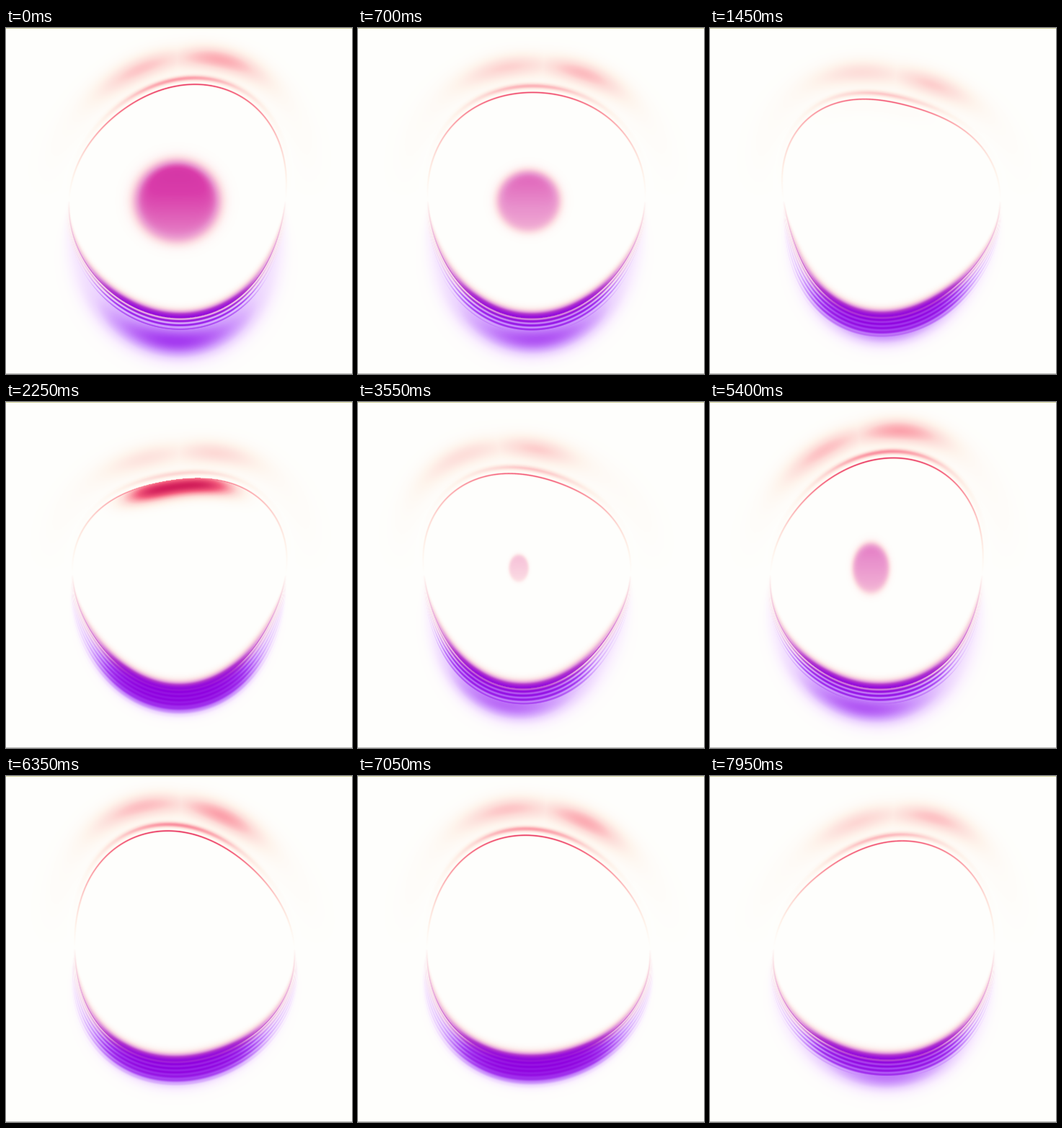
Recreate the animation shown at these times as an HTML page with a canvas. Size 480 px wide and 480 px high, loop 8 s.

```html
<!DOCTYPE html>
<html lang="en">
<head>
<meta charset="utf-8">
<title>Breathing ring</title>
<style>
html, body { margin: 0; width: 100%; height: 100%; overflow: hidden; background: #fefefc; }
canvas { display: block; width: 100vw; height: 100vh; }
</style>
</head>
<body>
<canvas id="stage" width="480" height="480"></canvas>
<script>
const SIZE = 480, LOOP = 8000, STEP = 50, BINS = 2048;
const ctx = document.getElementById('stage').getContext('2d');
const image = ctx.createImageData(SIZE, SIZE), px = image.data.fill(255);

const lerp = (a, b, u) => a + (b - a) * u;
const clamp = x => Math.max(0, Math.min(1, x));
const bell = x => Math.exp(-x * x);
const plateau = x => Math.exp(-(x ** 4));
const sigmoid = x => 1 / (1 + Math.exp(x));

function makeRamp(hexes) {
  const stops = [0, .1, .25, .45, .7, 1];
  const colors = hexes.split(' ').map(h => [0, 2, 4].map(i => parseInt(h.slice(i, i + 2), 16)));
  const out = new Float32Array(256 * 3);
  for (let n = 0, i = 0; n < 256; n++) {
    const v = n / 255;
    while (i < 4 && v > stops[i + 1]) i++;
    const u = (v - stops[i]) / (stops[i + 1] - stops[i]);
    out.set(colors[i].map((c, j) => lerp(c, colors[i + 1][j], u)), n * 3);
  }
  return out;
}
const rose = makeRamp('fefefc fef4ec fddcd8 fca8b0 f25a7c d21e5a');
const orchid = makeRamp('fefefc fde6e8 f6c0d8 e890cc d93caa c8289b');
const plum = makeRamp('fefefc fdf2f0 f8d7e1 e4a0dc b43ccd 8e00de');
const haze = makeRamp('fefefc faf0fe ecd4fe cd96fc a53cf0 8e00de');

// Polar coordinates of every pixel, clockwise from the top.
const bin = new Uint16Array(SIZE * SIZE), dist = new Float32Array(SIZE * SIZE);
for (let y = 0, i = 0; y < SIZE; y++) for (let x = 0; x < SIZE; x++, i++) {
  const dx = x + .5 - 240, dy = y + .5 - 240;
  bin[i] = Math.floor((Math.atan2(dx, -dy) / (2 * Math.PI) + 1) * BINS) % BINS;
  dist[i] = Math.hypot(dx, dy);
}

function paint(i, v, ramp, other = ramp, mix = 0) {
  const n = Math.round(clamp(v) * 255) * 3;
  for (let c = 0; c < 3; c++) px[i * 4 + c] = lerp(ramp[n + c], other[n + c], mix);
}

function draw(ms) {
  const t = ms / 1000;
  const wave = (mid, amp, period, peak) => mid + amp * Math.cos(2 * Math.PI * (t - peak) / period);

  // The outline is a circle bent by three slowly drifting harmonics.
  const radius = wave(150.3, 5.5, 6.8, 6.5);
  const rise = wave(-1.7, 4.3, 7, 5.8), sway = wave(-2, 9, 6.2, 1.15);
  const oval = wave(2.5, 4, 5.75, 5.1), tilt = wave(.6, 5.2, 2.65, 0);
  const corner = wave(-2.5, 4.5, 8.6, 6.8), twist = wave(-1, 5, 2.65, 0);

  // One pulse opens the core and loosens the lower rim.
  const pulse = wave(0, 1, 4.6, 0);
  const heat = wave(.33, .11, 7, 6);
  const flare = bell((t - 2.25) / .4);
  const depth = 26 - 6 * pulse, reach = 56 + 13 * pulse, looseness = .1 + .18 * pulse;

  const rays = Array.from({ length: BINS }, (_, n) => {
    const a = n / BINS * 2 * Math.PI;
    const deg = (n / BINS * 360 + 180) % 360 - 180;
    const up = Math.cos(a), down = Math.max(0, -up);
    const top = deg - 1.3 * sway;
    const low = (deg + 360) % 360 - 183 + .9 * sway;
    const dense = plateau(low / 44);
    return {
      up, dense,
      r: radius + rise * up + sway * Math.sin(a)
        + oval * Math.cos(2 * a) + tilt * Math.sin(2 * a)
        + corner * Math.cos(3 * a) + twist * Math.sin(3 * a),
      glow: heat * Math.max(bell((top - 14) / 18), .75 * bell((top + 18) / 20)),
      band: 1.2 * heat * bell(deg / 36),
      line: (.45 + heat) * Math.pow(Math.max(0, up), 1.3),
      flare: flare * plateau((deg + 1) / 33),
      scale: Math.max(.07, down),
      power: Math.min(1, 1.1 * Math.pow(down, .7)),
      cloud: (.42 + .16 * pulse) * bell(low / 32),
      stripe: .65 * Math.max(0, looseness + .15 + .25 * (1 - dense)),
      core: (.38 + .62 * dense) * (1 - .3 * Math.max(0, looseness))
    };
  });

  const topShade = (ray, d) => {
    const squeeze = .35 + .65 * ray.up;
    const rim = Math.max(
      ray.line * bell(d / 1.2),
      ray.band * bell((d - 9 * squeeze) / 4),
      d < 1 ? ray.flare * bell((d + 9) / 14) : 0);
    const dust = d > 12 ? .04 * ray.up * bell((d - 34) / 24) : 0;
    return rim + ray.glow * bell((d - 38) / 16) + dust;
  };

  const lowShade = (ray, d) => {
    const s = d / ray.scale, line = .75 * bell(d / 1.3);
    if (d < 0) return ray.power * Math.max(line, bell(s / 10) * (.5 + .45 * ray.dense));
    const grooves = 1 - ray.stripe * (1 + Math.cos(s * 1.1 - 1.9));
    const core = sigmoid((s - depth) / 4) * ray.core * grooves;
    const mist = .25 * bell(1.7 * s / reach);
    const cloud = ray.cloud * bell((s - reach * .5) / (reach * .32));
    return ray.power * Math.max(line, core, mist + cloud);
  };

  const opening = Math.max(0, pulse), grow = Math.sqrt(opening) || 1;
  const cx = wave(229, 8, 8.9, 0), cy = wave(235, 6, 8.9, 0);
  const rx = wave(50, 13, 8.9, 0) * grow, ry = wave(57, 3, 8.9, 0) * grow;
  const coreShade = (x, y) => {
    const nx = (x - cx) / rx, ny = (y - cy) / ry;
    return Math.pow(opening, .6) * .66 * sigmoid((Math.hypot(nx, ny) - .92) * 13) * (1 - .3 * ny);
  };

  for (let y = 0, i = 0; y < SIZE; y++) for (let x = 0; x < SIZE; x++, i++) {
    const ray = rays[bin[i]], d = dist[i] - ray.r;
    if (d < -45) paint(i, coreShade(x, y), orchid);
    else if (d > 95) paint(i, 0, rose);
    else if (ray.up > 0) paint(i, topShade(ray, d), rose);
    else paint(i, lowShade(ray, d), plum, haze, clamp(d / 9));
  }
  ctx.putImageData(image, 0, 0);
  ctx.fillStyle = '#cfcf98';
  ctx.fillRect(0, 0, SIZE, 1);
  ctx.fillStyle = '#bcbcb8';
  ctx.fillRect(0, SIZE - 1, SIZE, 1);
}

const start = performance.now();
let shown = -1;
function tick() {
  const t = Math.floor(((performance.now() - start) % LOOP) / STEP) * STEP;
  if (t !== shown) draw(shown = t);
  requestAnimationFrame(tick);
}
tick();
</script>
</body>
</html>
```
